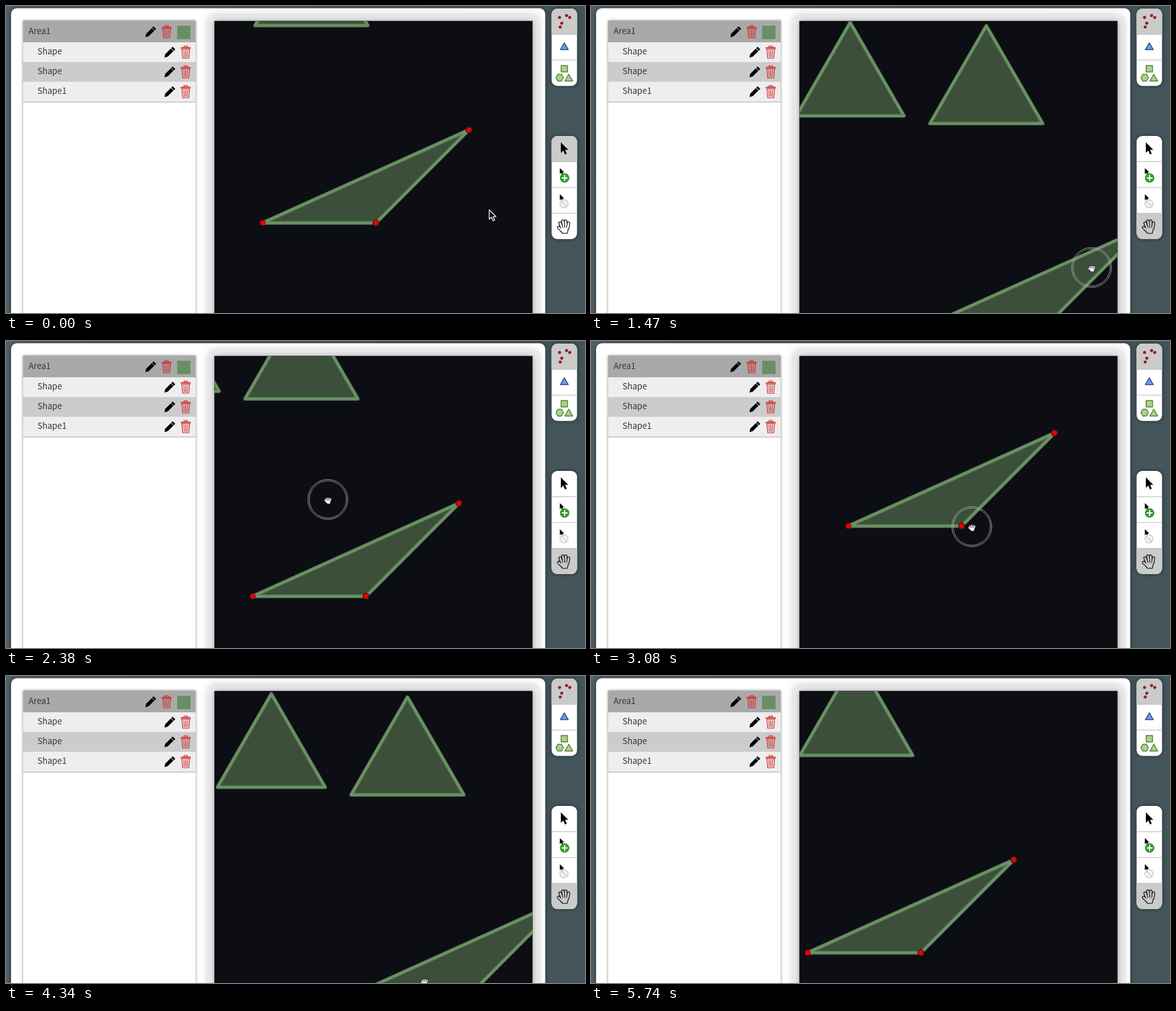
Recreate the animation shown at these times as an HTML page with a canvas. Size 910 px wide and 482 px high, loop 6.23 s.

```html
<!DOCTYPE html>
<html lang="en">
<head>
<meta charset="utf-8">
<title>Shape editor</title>
<style>
  html, body { margin: 0; width: 100%; height: 100%; overflow: hidden; background: #46575b; }
  canvas { display: block; width: 910px; height: 482px; }
</style>
</head>
<body>
<canvas id="stage" width="910" height="482"></canvas>
<script>
const ctx = document.getElementById('stage').getContext('2d');
const LOOP = 6230, STEP = 70, PICK_HAND = 490, LEAVE = 5740;
const RED = '#cf2a2a';
const FONT = '13.1px "Noto Sans CJK JP", "Noto Sans CJK SC", "Noto Sans", sans-serif';

// Pointer gestures: start, end, destination; a drag pans the scene along
const move = (t0, t1, x, y) => ({ t0, t1, x, y });
const drag = (t0, t1, x, y) => ({ t0, t1, x, y, pan: true });
const gestures = [
  move(0, 350, 872, 346), move(490, 1050, 645, 256),
  drag(1190, 1540, 791, 415), move(1680, 1960, 667, 347),
  drag(2100, 2450, 500, 245), move(2590, 2870, 576, 398),
  drag(2940, 3080, 598, 291), drag(3080, 3220, 741, 191),
  move(3290, 3360, 709, 150), move(3500, 3780, 650, 172),
  drag(3990, 4060, 622, 352), drag(4060, 4340, 657, 478),
  move(4550, 4830, 617, 382), drag(4970, 5250, 403, 320),
  move(5390, 5670, 362, 466)
];

const clamp = v => Math.min(1, Math.max(0, v));
const ease = u => u < 0.5 ? 4 * u ** 3 : 1 - 4 * (1 - u) ** 3;

function poseAt(t) {
  const pose = { x: 758, y: 320, panX: 403.5, panY: 340.5, pressed: false };
  let fromX = pose.x, fromY = pose.y;
  for (const g of gestures) {
    const k = ease(clamp((t - g.t0) / (g.t1 - g.t0)));
    const dx = (g.x - fromX) * k, dy = (g.y - fromY) * k;
    pose.x += dx;
    pose.y += dy;
    if (g.pan) {
      pose.panX += dx;
      pose.panY += dy;
      pose.pressed ||= t >= g.t0 - STEP && t < g.t1;
    }
    fromX = g.x;
    fromY = g.y;
  }
  return pose;
}

function box(x, y, w, h, fill) {
  ctx.fillStyle = fill;
  ctx.fillRect(x, y, w, h);
}

function roundBox(x, y, w, h, r, fill) {
  ctx.beginPath();
  ctx.roundRect(x, y, w, h, r);
  ctx.fillStyle = fill;
  ctx.fill();
}

function shadow(blur, color, draw) {
  ctx.save();
  ctx.shadowBlur = blur;
  ctx.shadowColor = color;
  draw();
  ctx.restore();
}

function clipRound(x, y, w, h, r, draw) {
  ctx.save();
  ctx.beginPath();
  ctx.roundRect(x, y, w, h, r);
  ctx.clip();
  draw();
  ctx.restore();
}

function poly(points, fill, stroke, width) {
  ctx.beginPath();
  points.forEach(p => ctx.lineTo(p[0], p[1]));
  ctx.closePath();
  if (fill) { ctx.fillStyle = fill; ctx.fill(); }
  if (stroke) {
    ctx.lineJoin = 'round';
    ctx.strokeStyle = stroke;
    ctx.lineWidth = width;
    ctx.stroke();
  }
}

// Corner points of a regular polygon
function ngon(n, x, y, r, turn = 0) {
  return Array.from({ length: n }, (_, i) => {
    const a = turn + i * 2 * Math.PI / n;
    return [x + r * Math.cos(a), y + r * Math.sin(a)];
  });
}

function disc(x, y, r, fill, stroke, width) {
  ctx.beginPath();
  ctx.arc(x, y, r, 0, 7);
  if (fill) { ctx.fillStyle = fill; ctx.fill(); }
  if (stroke) { ctx.strokeStyle = stroke; ctx.lineWidth = width; ctx.stroke(); }
}

function line(x0, y0, x1, y1, color, width) {
  ctx.beginPath();
  ctx.moveTo(x0, y0);
  ctx.lineTo(x1, y1);
  ctx.strokeStyle = color;
  ctx.lineWidth = width;
  ctx.lineCap = 'round';
  ctx.stroke();
}

function at(x, y, scale, draw) {
  ctx.save();
  ctx.translate(x, y);
  ctx.scale(scale, scale);
  draw();
  ctx.restore();
}

function arrow(x, y, scale, fill, edge) {
  at(x, y, scale, () => poly(
    [[0, 0], [0, 15.5], [3.6, 12.2], [6.2, 18], [8.8, 16.9], [6.3, 11.2], [11, 11]], fill, edge, 1.3));
}

// Four fanned fingers and a thumb; reach is the finger length
function hand(x, y, scale, reach, fill, edge) {
  const layer = (color, grow) => {
    for (let i = 0; i < 4; i++) {
      const tip = -reach * Math.sin((i + 1.1) * Math.PI / 5.2);
      line(-6.6 + 4.4 * i, tip, -3.6 + 3 * i, 2, color, 2.8 + grow);
    }
    line(-9, 1.2, -4, 6, color, 2.8 + grow);
    poly([[-4, 1], [5.6, 1], [4, 9.5], [-2.4, 9.5], [-4.8, 6]], color, color, 0.8 + grow);
  };
  at(x, y, scale, () => {
    layer(edge, 2.4);
    layer(fill, 0);
    for (let i = 0; i < 3; i++) line(-3.2 + 3.6 * i, -reach * 0.3, -2.2 + 3 * i, 1.5, edge, 0.9);
  });
}

function pencil(x, y) {
  at(x, y, 1, () => {
    poly([[0, 17], [1.3, 11.5], [10.2, 2.8], [14.1, 6.7], [5.2, 15.6]], '#000');
    poly([[11.2, 1.9], [13, 0.5], [16.4, 3.9], [15, 5.7]], '#000', '#000', 1);
  });
}

function trash(x, y) {
  at(x, y, 1, () => {
    poly([[0.8, 3.4], [15.2, 3.4], [15.2, 5], [0.8, 5]], null, RED, 1.1);
    poly([[5, 3], [5.4, 0.8], [10.6, 0.8], [11, 3]], null, RED, 1.1);
    poly([[2, 6], [14, 6], [12.8, 20], [3.2, 20]], null, RED, 1.2);
    for (let i = -1; i <= 1; i++) line(8 + 2.8 * i, 8, 8 + 2.3 * i, 18, RED, 1.1);
  });
}

function label(text, x, y) {
  ctx.font = FONT;
  ctx.fillStyle = '#333';
  ctx.fillText(text, x, y);
}

function drawBackground() {
  const g = ctx.createLinearGradient(0, 0, 910, 0);
  g.addColorStop(0, '#526268');
  g.addColorStop(1, '#43555a');
  box(0, 0, 910, 482, g);
  shadow(8, 'rgba(0,0,0,.45)', () => roundBox(8, 3.5, 839.5, 520, 9, '#fff'));
  clipRound(8, 3.5, 839.5, 520, 9, () => {
    shadow(12, 'rgba(0,0,0,.2)', () => roundBox(318, 14, 519, 520, 10, '#ececec'));
    shadow(10, 'rgba(0,0,0,.3)', () => box(327.5, 23.5, 500, 500, '#999'));
  });
}

function drawSidebar() {
  shadow(4, 'rgba(0,0,0,.5)', () => box(27, 23, 271, 500, '#fff'));
  box(27, 23, 271, 34, '#a9a9a9');
  label('Area1', 35.5, 44.3);
  pencil(219, 32);
  trash(244.5, 30);
  box(269, 31, 21, 21, '#688f64');
  ['Shape', 'Shape', 'Shape1'].forEach((name, i) => {
    const y = 57 + 31 * i;
    box(27, y, 271, 31, i % 2 ? '#ccc' : '#eee');
    label(name, 49.5, y + 19.3);
    pencil(249, y + 7);
    trash(274.5, y + 5);
  });
  box(27, 150, 271, 1.5, '#c2c2c2');
}

function drawGroup(y, count, active) {
  const cell = 40.5, h = count * cell;
  shadow(6, 'rgba(0,0,0,.5)', () => roundBox(857.5, y, 40, h, 9, '#fff'));
  clipRound(857.5, y, 40, h, 9, () => {
    box(857, y + active * cell, 41, cell, '#cbcbcb');
    for (let i = 1; i < count; i++) box(857, y + i * cell - 0.5, 41, 1, '#bbb');
  });
}

function drawTools(panning) {
  drawGroup(4, 3, 0);
  [[870, 18], [881, 15], [886, 18], [873.5, 27], [871, 33]].forEach(([x, y]) =>
    disc(x, y, 2, '#c01818', '#6d1010', 0.9));
  const up = -Math.PI / 2;
  poly(ngon(3, 877.5, 65, 7.2, up), '#6d9ee0', '#2b4f93', 1.5);
  const leaves = [
    ngon(4, 877.5, 98.5, 7.1, up / 2), ngon(6, 870.2, 112.5, 6), ngon(3, 884.5, 114.2, 7.2, up)
  ];
  leaves.forEach(p => poly(p, '#a9d08e', '#548235', 1.4));

  drawGroup(204, 4, panning ? 3 : 0);
  arrow(872, 214, 1.06, '#000');
  arrow(870.5, 254.5, 0.62, '#000');
  disc(878, 270, 7, '#35a02c', '#238020', 0.8);
  line(874.3, 270, 881.7, 270, '#fff', 2);
  line(878, 266.3, 878, 273.7, '#fff', 2);
  arrow(870.5, 295.5, 0.62, '#000');
  disc(877, 310.5, 6.3, '#f3f3f3', '#c9c9c9', 1.4);
  line(872.8, 306.3, 881.2, 314.7, '#c9c9c9', 1.4);
  hand(877.5, 346.5, 1, 9, panning ? '#cbcbcb' : '#fff', '#111');
}

// Equilateral triangle on a base line
function equilateral(x, y, side) {
  return [[x, y], [x + side, y], [x + side / 2, y - side * Math.sqrt(3) / 2]];
}

function drawScene({ panX, panY }) {
  const selected = [[0, 0], [178, 0], [324, -146]];
  ctx.save();
  ctx.beginPath();
  ctx.rect(327.5, 23.5, 500, 459);
  ctx.clip();
  box(327, 23, 501, 460, '#0d0e14');
  ctx.translate(panX, panY);
  [equilateral(-222, -322, 169), equilateral(-12, -310, 177), selected].forEach(s => {
    poly(s, '#3c4f3b', '#4c7048', 5.8);
    poly(s, null, '#6b9167', 4);
  });
  selected.forEach(([x, y], i) => {
    if (i) disc(x, y, 5.4, '#1d2420');
    disc(x, y, 4.1, '#ee0000', '#7d0808', 1);
  });
  ctx.restore();
}

function drawPointer({ x, y, pressed }, panning) {
  if (pressed) [29.2, 31.4].forEach(r => disc(x + 0.5, y + 0.5, r, null, '#b4b4b4', 0.8));
  if (panning && x < 828) hand(x + 1.2, y + 1.2, 0.6, 4.5, '#fff', '#111');
  else arrow(x + 1.5, y, 0.96, '#111', '#fff');
}

function render(now) {
  const t = Math.floor((now % LOOP) / STEP) * STEP;
  const pose = poseAt(t), panning = t >= PICK_HAND;
  drawBackground();
  drawSidebar();
  drawScene(pose);
  drawTools(panning);
  if (t < LEAVE) drawPointer(pose, panning);
}

let start;
function tick(now) {
  start ??= now;
  render(now - start);
  requestAnimationFrame(tick);
}
render(0);
requestAnimationFrame(tick);
</script>
</body>
</html>
```
